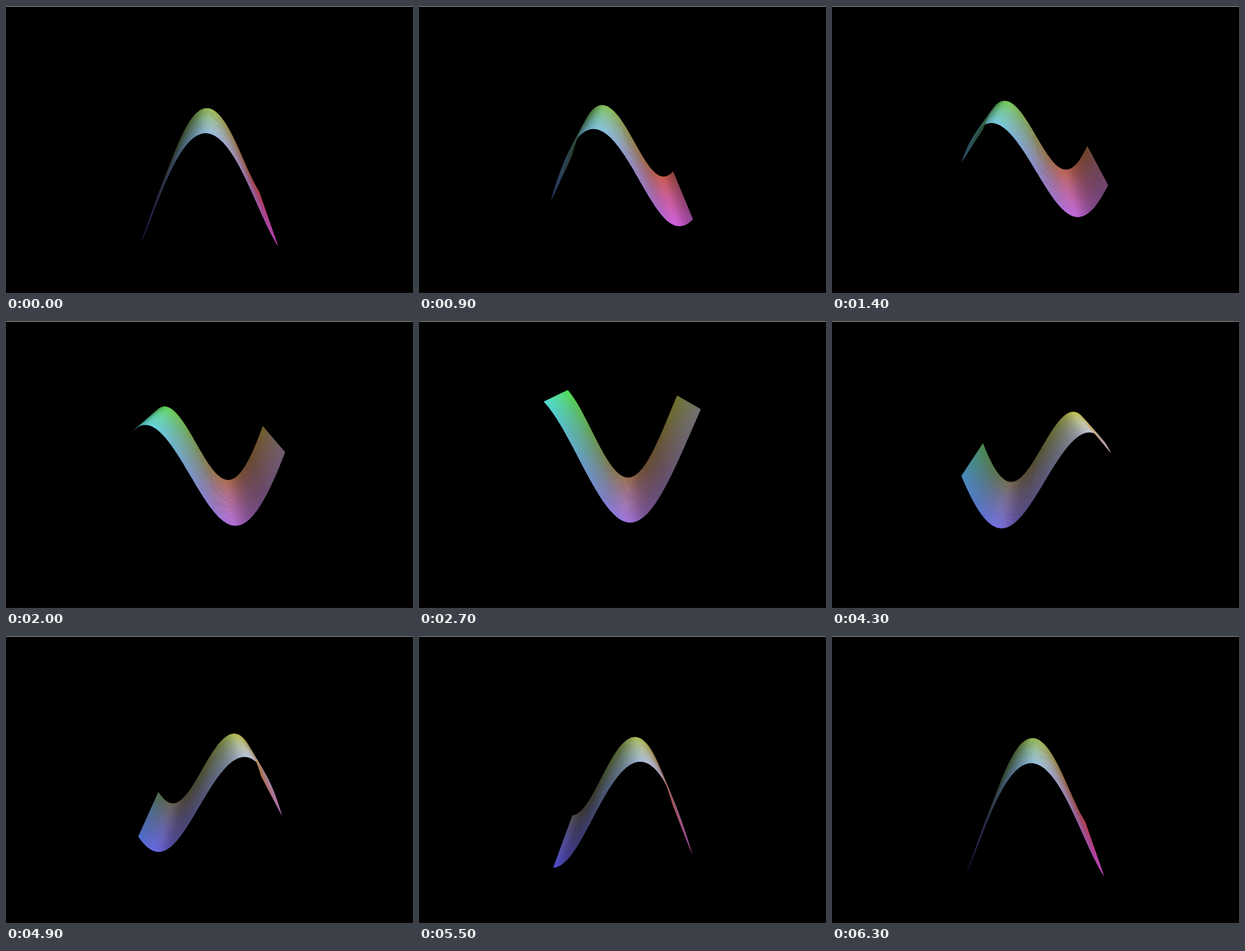
Animation of 600 by 424 pixels, one loop 6400 ms. Source, as an HTML page with a canvas:

```html
<!DOCTYPE html>
<html lang="en">
<head>
<meta charset="utf-8">
<title>Wave ribbon</title>
<style>
  html, body { margin: 0; width: 100%; height: 100%; overflow: hidden; background: #000; }
  canvas { display: block; width: 600px; height: 424px; }
</style>
</head>
<body>
<canvas id="stage" width="600" height="424"></canvas>
<script>
const W = 600, H = 424, STRIPS = 180;
const STEP = 100, STEPS = 64;
const ctx = document.getElementById('stage').getContext('2d');

// Camera: 45 degree view, tilted down, looking at the middle of the sheet
const FOCAL = H / 2 / Math.tan(Math.PI / 8);
const TILT_SIN = 0.2795, TILT_COS = 0.96, DIST = 5.68;

function project(x, y, z) {
  const k = FOCAL / (DIST - y * TILT_SIN - z * TILT_COS);
  return [W / 2 + x * k, H / 2 - (y * TILT_COS - z * TILT_SIN) * k];
}

// Travelling wave that swings wider and stretches towards both ends
function height(x, t) {
  const q = x * x;
  const swing = 0.535 + 0.46 * q + 0.165 * q * q;
  const phase = x * (3.3 - 0.3 * q) + t + 0.14;
  return swing * Math.cos(phase) - 0.02;
}

function light(x, t) {
  const e = 0.005;
  const slope = (height(x + e, t) - height(x - e, t)) / (2 * e);
  return 0.45 + Math.max(0, (0.41 - 0.18 * slope) / Math.hypot(1, slope));
}

// Position gives the hue: x to red, y to green, z to blue
function tint(x, y, z, lit) {
  const part = v => Math.round(255 * lit * Math.min(1, 0.68 + 0.3 * v));
  return `rgb(${part(x)},${part(y)},${part(z)})`;
}

function strip(a, b, t) {
  const mid = (a + b) / 2;
  const y = height(mid, t), lit = light(mid, t);
  const far = project(mid, y, -1), centre = project(mid, y, 0), near = project(mid, y, 1);
  const span = Math.hypot(near[0] - far[0], near[1] - far[1]);
  const half = Math.hypot(centre[0] - far[0], centre[1] - far[1]) / span;

  const fill = ctx.createLinearGradient(...far, ...near);
  fill.addColorStop(0, tint(mid, y, -1, lit));
  fill.addColorStop(half, tint(mid, y, 0, lit));
  fill.addColorStop(1, tint(mid, y, 1, lit));

  const inner = a - (b - a) * 0.6; // overlap hides the seams
  const yIn = height(inner, t), yOut = height(b, t);
  ctx.fillStyle = fill;
  ctx.beginPath();
  ctx.moveTo(...project(inner, yIn, -1));
  ctx.lineTo(...project(b, yOut, -1));
  ctx.lineTo(...project(b, yOut, 1));
  ctx.lineTo(...project(inner, yIn, 1));
  ctx.fill();
}

function draw(t) {
  ctx.fillStyle = '#000';
  ctx.fillRect(0, 0, W, H);
  ctx.fillStyle = '#999';
  ctx.fillRect(0, 0, W, 1);
  ctx.fillStyle = '#0a0204';
  ctx.fillRect(0, H - 2, W, 2);

  // Outer strips lie in front, so paint from the middle outwards
  const n = STRIPS / 2;
  for (let i = 0; i < n; i++) {
    strip(i / n, (i + 1) / n, t);
    strip(-i / n, -(i + 1) / n, t);
  }
}

function tick() {
  draw(Math.floor(performance.now() / STEP) % STEPS * 0.1);
  requestAnimationFrame(tick);
}
tick();
</script>
</body>
</html>
```
